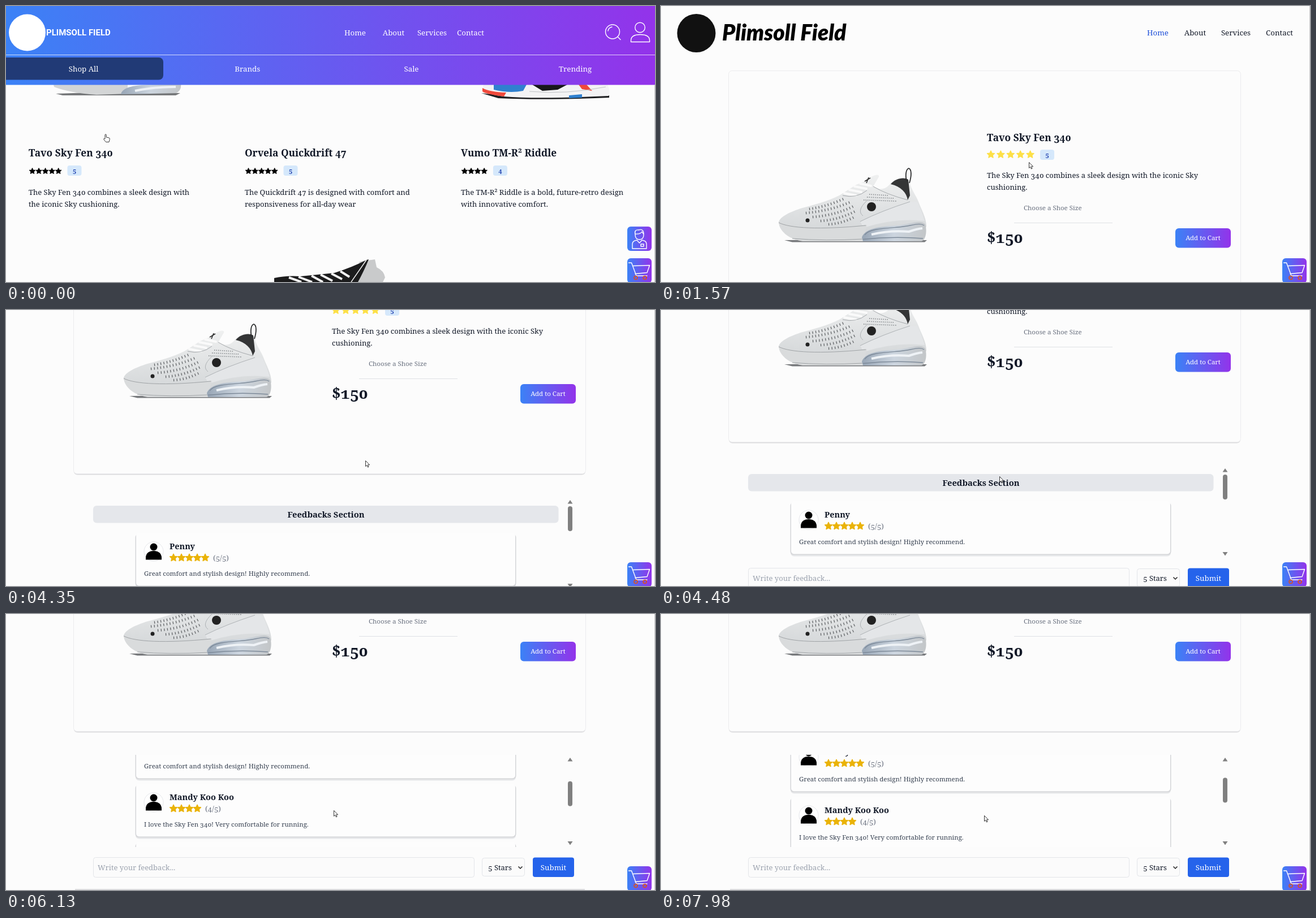
An HTML page that plays this animation: 1147x488 px, repeating every 8 s.

```html
<!DOCTYPE html>
<html lang="en">
<head>
<meta charset="utf-8">
<title>Shoe shop</title>
<style>
html, body { margin: 0; width: 100%; height: 100%; overflow: hidden; background: #fcfcfc; }
svg { display: block; }
text { font-family: 'Noto Serif', serif; font-variant-numeric: oldstyle-nums; fill: #111827; white-space: pre; }
.nav { font-size: 13.3px; text-anchor: middle; }
.light { fill: #fff; }
.title { font-size: 17.3px; font-weight: 700; }
.name { font-size: 14.5px; font-weight: 700; }
.body { font-size: 13px; }
.small { font-size: 11.5px; }
.mid { text-anchor: middle; }
.grey { fill: #6b7280; }
.note { fill: #374151; }
.badge { font-size: 11px; font-weight: 700; fill: #1e40af; text-anchor: middle; }
.icon { fill: none; stroke: #fff; stroke-width: 1.4; stroke-linecap: round; stroke-linejoin: round; }
</style>
</head>
<body>
<svg width="1147" height="488" viewBox="0 0 1147 488">
<defs>
  <linearGradient id="brand"><stop stop-color="#3b82f6"/><stop offset="1" stop-color="#9333ea"/></linearGradient>
  <linearGradient id="leather" x2="0" y2="1"><stop stop-color="#eff0f0"/><stop offset="1" stop-color="#d3d6d8"/></linearGradient>
  <linearGradient id="gel"><stop stop-color="#97a5b5"/><stop offset=".5" stop-color="#ccd5df"/><stop offset="1" stop-color="#c3c6c8"/></linearGradient>
  <path id="star" stroke-width=".2" stroke-linejoin="round" d="M0-.95 .28-.36 .92-.29 .45 .15 .57 .79 0 .47-.57 .79-.45 .15-.92-.29-.28-.36Z"/>
  <clipPath id="panel"><rect x="150" y="593" width="840" height="163"/></clipPath>

  <g id="shoe">
    <path d="M218 414Q340 412 470 414L466 417.500H232Z" fill="#77797c"/>
    <path d="M208 382C211 372 228 364 250 357C276 350 304 343 323 330L345 316 358 311 372 302C379 298 386 297 385 302L375 319C388 327 398 324 406 313C416 303 430 302 438 308C442 325 451 335 455 346C460 360 469 374 469 390L462 402 355 406 225 397Z" fill="url(#leather)"/>
    <path d="M406 315C414 305 429 302 437 307L440 335 436 343C434 330 424 319 406 315Z" fill="#343536"/>
    <path d="M434 310C431 296 434 288 438 287C443 289 443 300 439 313" fill="none" stroke="#2c2d2e" stroke-width="1.800"/>
    <path d="M360 310L370 304M363 313L367 303" stroke="#333" stroke-width="1.600"/>
    <path d="M324 331L345 335M333 325L354 329M342 319L363 323M352 314L371 318" stroke="#fafafa" stroke-width="4" stroke-linecap="round"/>
    <path d="M321 335Q345 341 364 326M375 319Q398 333 436 343" fill="none" stroke="#a5a9ac"/>
    <g fill="none" stroke="#5a5d60" stroke-width="4.500" stroke-dasharray="1.200 4.400">
      <path d="M262 359Q295 354 325 340M256 366Q300 362 336 346M268 373Q310 370 342 353M282 380Q315 378 345 362M296 386Q318 385 340 374"/>
    </g>
    <g fill="none" stroke="#8c9093" stroke-width="1.800" stroke-dasharray="1.500 2">
      <path d="M368 333L402 335M364 338L412 340M358 343L416 345"/>
    </g>
    <path d="M352 381Q390 362 440 346L453 347Q461 362 466 380Q415 374 358 392Z" fill="#e4e6e8"/>
    <path d="M352 381Q390 362 440 346M357 371Q345 362 364 344" fill="none" stroke="#aeb2b5"/>
    <path d="M208 381C228 391 270 393 300 392L364 387 357 416H250C233 413 220 406 213 396Q208 389 208 381Z" fill="#d9dbdc"/>
    <path d="M208 383C228 393 280 396 362 388M232 411Q290 416 357 412" fill="none" stroke="#9fa3a6"/>
    <path d="M355 409C362 391 392 390 420 388C443 385 458 377 467 386C471 400 467 415 460 416H357Z" fill="url(#gel)"/>
    <path d="M360 405C366 394 395 393 420 391C443 389 457 382 465 388M357 412.500Q410 407 463 411" fill="none" stroke="#7d8a99" stroke-width="1.400"/>
    <path d="M372 404Q405 396 438 399Q452 394 462 393" fill="none" stroke="#eef2f6" stroke-width="4"/>
    <circle cx="372" cy="355" r="8" fill="#222"/>
    <circle cx="259" cy="379" r="3.500" fill="#222"/>
  </g>

  <g id="avatar">
    <circle r="17" fill="#fff" stroke="#e5e7eb"/>
    <circle cy="-8" r="6.500"/>
    <path d="M-14 14.500V10C-13 1-6-1 0-1S13 1 14 10V14.500Z"/>
  </g>

  <g id="cart">
    <rect x="1098" y="446" width="43" height="44" rx="6" fill="url(#brand)"/>
    <path class="icon" d="M1100.500 454H1105.500L1114 477H1133M1107.500 459.500 1137.500 458.500 1133 471.500 1112 473.500"/>
    <g fill="none" stroke="#d9541e" stroke-width="1.600"><circle cx="1113" cy="480.500" r="3"/><circle cx="1129" cy="480.500" r="3"/></g>
  </g>
</defs>

<rect width="1147" height="488" fill="#fcfcfc"/>

<g id="home">
  <g id="products"></g>
  <g>
    <path d="M88 155Q200 150 308 154L300 158H100Z" fill="#77797b"/>
    <path d="M82 130H215V155L160 157Q110 153 85 143Z" fill="#d3d5d6"/>
    <path d="M203 156Q206 142 240 140L309 136Q311 150 300 154Z" fill="url(#gel)"/>
    <path d="M228 150Q260 143 300 143" fill="none" stroke="#eef2f6" stroke-width="4"/>
  </g>
  <g>
    <path d="M840 154Q900 162 1066 158V162Q950 167 870 163Z" fill="#1d1e20"/>
    <path d="M846 130H1058Q1070 148 1065 159Q940 165 880 160Q845 155 842 148Z" fill="#f3f3f4"/>
    <path d="M842 145Q855 152 884 153L880 160Q848 156 842 151Z" fill="#ef4a3c"/>
    <path d="M862 139H920L914 150Q890 155 862 148Z" fill="#2f80cf"/>
    <path d="M930 139H992L975 148 948 150Z" fill="#17181a"/>
    <path d="M1012 139H1026L1036 150 1018 147Z" fill="#f0483a"/>
    <path d="M995 158L1018 156V162L995 163Z" fill="#2f80cf"/>
    <path d="M925 151Q990 157 1060 143" fill="none" stroke="#bfc2c5"/>
  </g>
  <g>
    <path d="M625 452L652 448 655 462Q668 468 670 480L666 488H610Z" fill="#c9cacb"/>
    <path d="M474 488V481Q495 476 520 478L580 472Q612 462 637 449L641 448Q632 470 622 488Z" fill="#1c1c1d"/>
    <path d="M500 480L522 488M517 479L541 488M540 477L560 488M556 475L577 486M575 473L594 483M591 469L607 479" stroke="#f4f4f4" stroke-width="4"/>
    <path d="M637 449L610 488" stroke="#eee" stroke-width="1.500"/>
  </g>
  <rect width="1147" height="139.500" fill="url(#brand)"/>
  <path d="M0 86.500H1147" stroke="#fff" stroke-opacity=".75"/>
  <rect x="-10" y="91" width="288" height="39.500" rx="8" fill="#213a76"/>
  <circle cx="37.500" cy="47" r="32.500" fill="#fff"/>
  <text x="71" y="51.500" class="light" style="font:700 15px Roboto,sans-serif">PLIMSOLL FIELD</text>
  <g id="menu"></g>
  <g class="icon">
    <circle cx="1072" cy="45.500" r="12.500"/><path d="M1081 54.500L1086 59.500M1064 44Q1065 38 1071 37"/>
    <circle cx="1120.500" cy="38" r="8.800"/>
    <path d="M1104.500 63.500V61C1104.500 53 1112 50.500 1121 50.500S1137.500 53 1137.500 61V63.500Z"/>
  </g>
  <rect x="1098" y="390" width="43" height="43" rx="6" fill="url(#brand)"/>
  <g class="icon">
    <path d="M1112 404Q1110 395 1118 396Q1127 393 1127 404Q1127 413 1119.500 413Q1112 413 1112 404ZM1112 403Q1121 404 1124 399L1127 404"/>
    <path d="M1107 429V421Q1107 415 1115 414L1119.500 419 1124 414Q1132 415 1132 421V429Z"/>
    <rect x="1122" y="421" width="5" height="4"/>
  </g>
</g>

<g id="detail">
  <g id="page">
    <circle cx="62.500" cy="48" r="34" fill="#111"/>
    <text x="108" y="61" style="font:italic 900 39px Lato,cursive;fill:#000">Plimsoll Field</text>
    <g id="links"></g>
    <rect x="120" y="116" width="904" height="437.500" rx="6" fill="#dcdcde"/>
    <rect x="119.500" y="114.500" width="905" height="437" rx="6" fill="#fcfcfc" stroke="#ececee"/>
    <use href="#shoe"/>
    <text x="576" y="238.500" class="title">Tavo Sky Fen 340</text>
    <g id="rating"></g>
    <text x="576" y="303.500" class="body">The Sky Fen 340 combines a sleek design with the iconic Sky</text>
    <text x="576" y="324.500" class="body">cushioning.</text>
    <text x="641" y="360.500" class="small grey">Choose a Shoe Size</text>
    <path d="M624 383.500H798" stroke="#dfe1e5"/>
    <text x="576" y="418.500" style="font-size:27.5px;font-weight:700">$150</text>
    <rect x="909" y="393" width="98" height="34.500" rx="6" fill="url(#brand)"/>
    <text x="958" y="414" class="small mid light">Add to Cart</text>

    <g clip-path="url(#panel)"><g id="list">
      <rect x="154" y="608" width="822.500" height="30.500" rx="6" fill="#e5e7eb"/>
      <text x="565.500" y="628.500" class="mid" style="font-size:14.7px;font-weight:700">Feedbacks Section</text>
      <g id="cards"></g>
    </g></g>
    <g fill="#808080">
      <path d="M992.500 604.500L997 598 1001.500 604.500ZM992.500 746L997 752.500 1001.500 746Z"/>
      <rect id="thumb" x="993" y="609" width="8" height="44" rx="4"/>
    </g>
    <g fill="#fbfbfb" stroke="#e3e5e9">
      <rect x="154.500" y="774.500" width="673" height="35" rx="4"/>
      <rect x="841.500" y="775.500" width="75" height="32" rx="4"/>
    </g>
    <text x="162" y="796.500" class="body" style="fill:#9ca3af">Write your feedback...</text>
    <text x="852" y="796.500" class="body">5 Stars</text>
    <path d="M905.500 790.500L909 794 912.500 790.500" fill="none" stroke="#222" stroke-width="1.500"/>
    <rect x="931" y="774.500" width="73" height="34.500" rx="4" fill="#2563eb"/>
    <text x="967.500" y="796.500" class="nav light">Submit</text>
    <path d="M122 831H1023" stroke="#d6d6d8" stroke-width="1.500"/>
  </g>
</g>

<use href="#cart"/>
<path d="M1146.500 0V488" stroke="#c8c8ca" id="edge"/>
<g id="cursor" stroke="#222" fill="#fff" stroke-linejoin="round">
  <path id="arrow" d="M.5 .5V10.500L2.800 8.400 4.400 12 6 11.300 4.500 7.800H7.600Z" stroke-width=".9"/>
  <path id="hand" d="M-1 9V1.500Q0 0 1.200 1.500V6L6 7Q7.500 7.500 7.300 9.500L6 14.500H.5L-3.500 9.500Q-3.500 7.500-1 9Z" stroke-width=".9"/>
</g>
</svg>

<script>
const $ = id => document.getElementById(id);

const text = (x, y, cls, s) => `<text x="${x}" y="${y}" class="${cls}">${s}</text>`;
const stars = (n, x, y, r, gap, color) => Array.from({ length: n }, (_, i) =>
  `<use href="#star" fill="${color}" stroke="${color}" transform="translate(${x + i * gap} ${y}) scale(${r})"/>`).join('');
const badge = (x, y, n) =>
  `<rect x="${x}" y="${y}" width="25" height="18" rx="4" fill="#d5e8fb"/>` + text(x + 12.5, y + 13.2, 'badge', n);

const product = (x, title, n, line1, line2) =>
  text(x, 266, 'title', title) +
  stars(n, x + 6.5, 292, 5.5, 11.55, '#000') +
  badge(x + 10.7 + n * 11.55, 282, n) +
  text(x, 334, 'body', line1) + text(x, 355, 'body', line2);

const review = (i, name, n, note) => `<g transform="translate(0 ${i * 103})">
  <rect x="229" y="660" width="672" height="93.500" rx="6" fill="#e6e7e9"/>
  <rect x="228.500" y="658" width="673" height="93" rx="6" fill="#d4d5d8"/>
  <rect x="230" y="656" width="670" height="93.500" rx="5" fill="#fdfdfd"/>
  <use href="#avatar" x="261" y="689"/>` +
  text(289, 685, 'name', name) +
  stars(n, 296, 700, 7, 14, '#eab308') +
  text(296 + n * 14, 704.5, 'body grey', `(${n}/5)`) +
  text(244, 732, 'small note', note) + '</g>';

$('products').innerHTML =
  product(40, 'Tavo Sky Fen 340', 5, 'The Sky Fen 340 combines a sleek design with', 'the iconic Sky cushioning.') +
  product(422, 'Orvela Quickdrift 47', 5, 'The Quickdrift 47 is designed with comfort and', 'responsiveness for all-day wear') +
  product(804, 'Vumo TM-R² Riddle', 4, 'The TM-R² Riddle is a bold, future-retro design', 'with innovative comfort.');

const pages = ['Home', 'About', 'Services', 'Contact'];
const links = (xs, cls) => pages.map((s, i) => text(xs[i], 52, cls, s)).join('');
$('menu').innerHTML = links([617, 685, 753, 821], 'nav light') +
  ['Shop All', 'Brands', 'Sale', 'Trending'].map((s, i) => text(137 + i * 289.7, 115.5, 'nav light', s)).join('');
$('links').innerHTML = links([878, 944, 1016, 1093], 'nav');
$('links').firstChild.style.fill = '#1d4ed8';
$('rating').innerHTML = stars(5, 583, 262.7, 7, 17.4, '#fde047') + badge(670, 254, 5);
$('cards').innerHTML =
  review(0, 'Penny', 5, 'Great comfort and stylish design! Highly recommend.') +
  review(1, 'Mandy Koo Koo', 4, 'I love the Sky Fen 340! Very comfortable for running.') +
  review(2, 'Wanda', 4, 'Good quality, but the size runs a bit small.') +
  review(3, 'Rolf Dun', 5, 'Good Shoe. Best for running');

// Held values: [time, ...value]
const pointer = [
  [0, 176, 226], [130, 188, 214], [260, 262, 248], [390, 372, 300], [520, 480, 335],
  [660, 520, 330], [790, 565, 320], [920, 606, 309], [1050, 635, 299], [1180, 652, 291], [1300, 659, 287],
  [1440, 654, 281], [1570, 650, 276], [3700, 661, 253],
  [4350, 635, 266], [4480, 598, 294], [4610, 562, 316], [4740, 612, 314], [4850, 740, 306], [4970, 860, 298], [5090, 916, 285],
  [5210, 1000, 250], [5340, 1073, 235], [5470, 1040, 285], [5600, 1005, 364], [5720, 740, 360], [5840, 579, 347],
  [7080, 574, 351], [7210, 570, 355], [7600, 571, 356]
];
const pageScroll = [[0, 0], [3830, 70], [3960, 172], [4350, 262], [4480, 318], [4610, 344]];
const listScroll = [[0, 0], [5990, 35], [6130, 115], [6260, 215], [6390, 295], [6540, 326], [7860, 190], [7980, 92]];

const held = (track, t) => track.findLast(k => k[0] <= t).slice(1);
const shift = (el, x, y) => el.setAttribute('transform', `translate(${x} ${y})`);
const show = (el, on) => { el.style.display = on ? '' : 'none'; };

function draw(t) {
  const home = t < 660;
  const [top] = held(pageScroll, t), [offset] = held(listScroll, t);
  show($('home'), home);
  show($('hand'), home);
  show($('detail'), !home);
  show($('arrow'), !home);
  shift($('edge'), 0, home ? 139 : 0);
  shift($('page'), 0, -top);
  shift($('list'), 0, -offset);
  shift($('thumb'), 0, offset * 87 / 326);
  shift($('cursor'), ...held(pointer, t));
}

const start = performance.now();
function loop() {
  draw((performance.now() - start) % 8000);
  requestAnimationFrame(loop);
}
draw(0);
loop();
</script>
</body>
</html>
```
